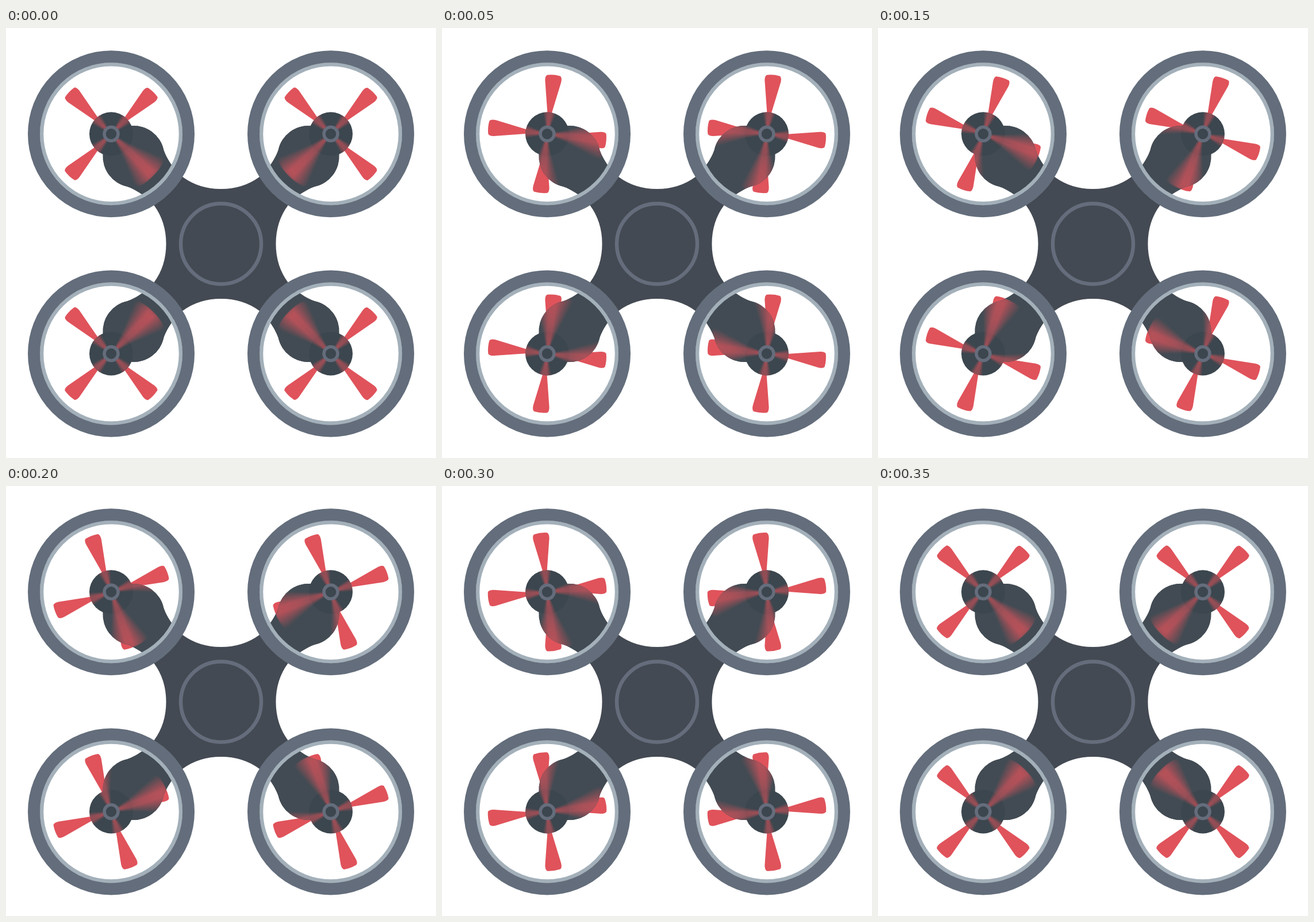
Animation of 748 by 748 pixels, one loop 400 ms. Source, as an HTML page with a canvas:

```html
<!DOCTYPE html>
<html lang="en">
<head>
<meta charset="utf-8">
<title>Quadcopter</title>
<style>
  html, body { margin: 0; width: 100%; height: 100%; overflow: hidden; background: #fff; }
  canvas { display: block; width: 748px; height: 748px; }
</style>
</head>
<body>
<canvas id="stage" width="748" height="748"></canvas>
<script>
const SIZE = 748, STEP_MS = 50, STEPS = 8, TURN = Math.PI * 2;
const RED = '#e0535b', BODY = '#444a53', ARM = '#424b53', HUB = '#3b464e';
const RIM = '#636d7b', LINING = '#a3b0ba', TRIM = '#656d7c';
const CENTER = { x: 374, y: 375.5 };
const HUBS = [[183, 184.3], [565, 184.3], [565, 566.5], [183, 566.5]];
const ctx = document.getElementById('stage').getContext('2d');

// Blade along +x, hub at the origin
const blade = new Path2D(
  'M6 -1 L38 -4 L92 -14 Q100 -15 102 -11.5 Q104.5 0 102.5 11.5 Q100 15 92 14 L38 4 L6 1 Z');

// Arm along +x, body centre at the origin
const arm = new Path2D(
  'M0 0 L67.5 -67.5 Q94.7 -40.3 130 -35 C142 -33.2 168 -36 186 -45' +
  'A53.5 53.5 0 1 1 186 45 C168 36 142 33.2 130 35 Q94.7 40.3 67.5 67.5 Z');

function disc(x, y, r) {
  const path = new Path2D();
  path.arc(x, y, r, 0, TURN);
  return path;
}

function strokeCircle(x, y, r, width, color) {
  ctx.lineWidth = width;
  ctx.strokeStyle = color;
  ctx.stroke(disc(x, y, r));
}

const body = disc(CENTER.x, CENTER.y, 85);
for (let k = 0; k < 4; k++) {
  body.addPath(arm, new DOMMatrix().translate(CENTER.x, CENTER.y).rotate(45 + 90 * k));
}
const hubs = new Path2D(), wheels = new Path2D(), dark = new Path2D(body);
for (const [x, y] of HUBS) {
  hubs.addPath(disc(x, y, 38));
  wheels.addPath(disc(x, y, 121));
}
dark.addPath(hubs);

// Motion-blurred blade: faint copies swept over a small angle
function makeFan() {
  const canvas = document.createElement('canvas');
  canvas.width = canvas.height = 240;
  const g = canvas.getContext('2d');
  const copies = 32, sweep = 24 * Math.PI / 180;
  g.translate(120, 120);
  g.globalCompositeOperation = 'lighter';
  g.fillStyle = `rgba(255,255,255,${8 / 255})`;
  for (let i = 0; i < copies; i++) {
    g.save();
    g.rotate(((i + 0.5) / copies - 0.5) * sweep);
    g.fill(blade);
    g.restore();
  }
  g.globalCompositeOperation = 'source-in';
  g.fillStyle = RED;
  g.fillRect(-120, -120, 240, 240);
  return canvas;
}
const fan = makeFan();

function eachBlade(angle, paint) {
  for (const [x, y] of HUBS) {
    for (let k = 0; k < 4; k++) {
      ctx.save();
      ctx.translate(x, y);
      ctx.rotate(angle + k * TURN / 4);
      paint();
      ctx.restore();
    }
  }
}

function fill(path, color) {
  ctx.fillStyle = color;
  ctx.fill(path);
}

function draw(step) {
  const angle = TURN / 8 + step * TURN / 7;
  ctx.fillStyle = '#fff';
  ctx.fillRect(0, 0, SIZE, SIZE);

  ctx.fillStyle = RED;
  eachBlade(angle, () => ctx.fill(blade));

  fill(body, BODY);
  ctx.save();
  ctx.clip(wheels);
  fill(body, ARM);
  ctx.restore();
  fill(hubs, HUB);

  // Over dark parts the blades show their soft blur
  ctx.save();
  ctx.clip(dark);
  eachBlade(angle, () => ctx.drawImage(fan, -120, -120));
  ctx.restore();

  for (const [x, y] of HUBS) {
    strokeCircle(x, y, 121, 6.5, LINING);
    strokeCircle(x, y, 134.5, 21, RIM);
    fill(disc(x, y, 12), HUB);
    strokeCircle(x, y, 12, 5.5, TRIM);
  }
  strokeCircle(CENTER.x, CENTER.y, 70, 6.5, TRIM);
}

const start = performance.now();
let shown = -1;
function tick() {
  const step = Math.floor((performance.now() - start) / STEP_MS) % STEPS;
  if (step !== shown) draw(shown = step);
  requestAnimationFrame(tick);
}
tick();
</script>
</body>
</html>
```
